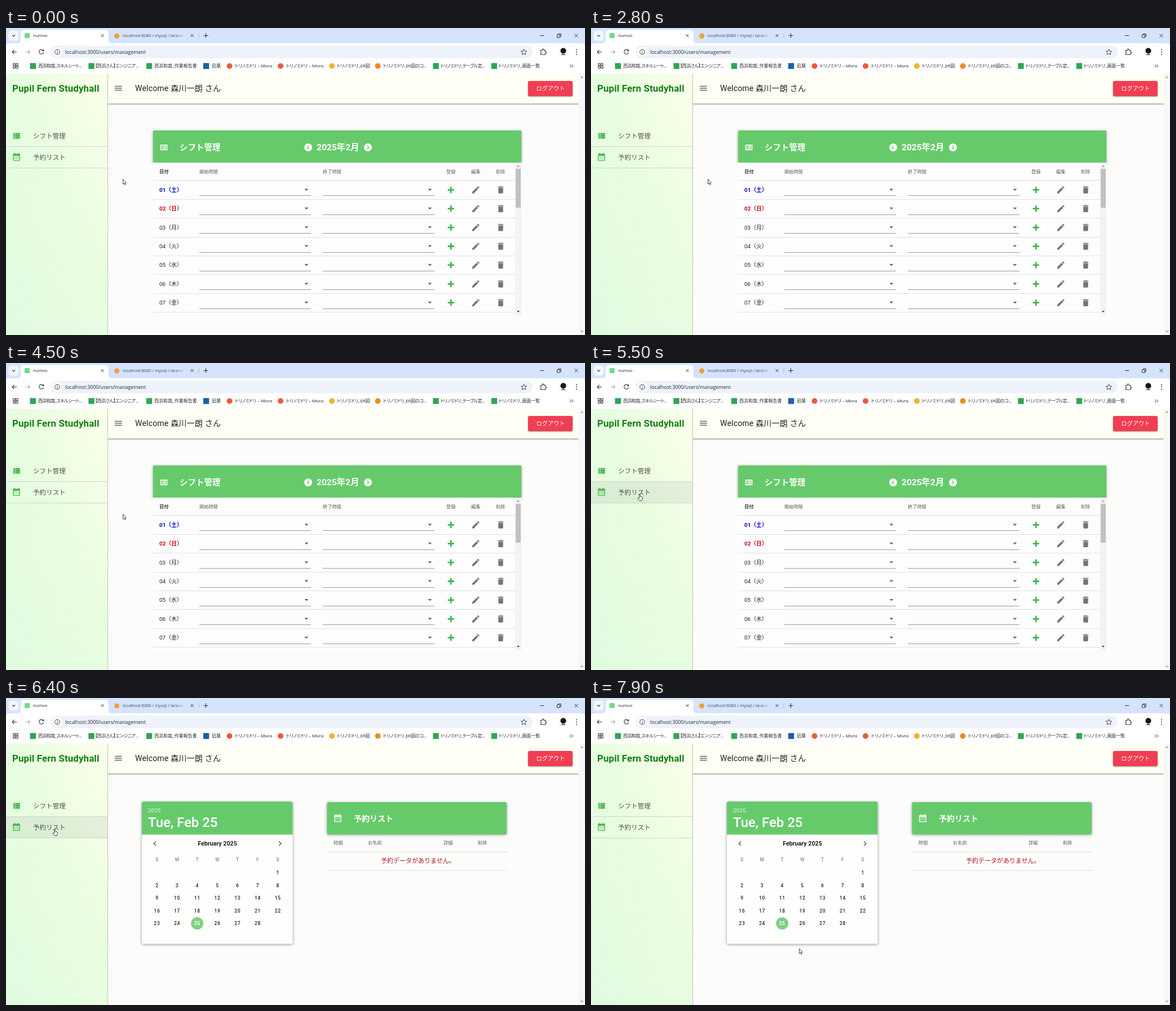
These frames come from a looping animation (1027x545 px, 8000 ms). An HTML page:

```html
<!DOCTYPE html>
<html lang="ja">
<head>
<meta charset="utf-8">
<title>Shift management</title>
<style>
html, body { margin: 0; width: 100%; height: 100%; overflow: hidden; background: #fff; }
svg { display: block; width: 1027px; height: 545px; }
text { white-space: pre; }
.app { font-family: Roboto, "Noto Sans CJK JP", sans-serif; }
.ui { font-family: "Open Sans", "Noto Sans CJK JP", sans-serif; font-feature-settings: "palt"; }
.card { filter: drop-shadow(0 1.5px 2.5px rgba(0,0,0,.42)); }
.low { filter: drop-shadow(0 1px 1.2px rgba(0,0,0,.4)); }
</style>
</head>
<body>
<svg id="stage" viewBox="0 0 1027 545" xmlns="http://www.w3.org/2000/svg"></svg>
<script>
const LOOP = 8000, GREEN = '#66ca6b', ICON_GREEN = '#43b649', INK = '#212121', GREY = '#5f5f5f';
const TEAM = 'トリノミドリ', OWNER = '西浜和哉';

const ICONS = {
  list: 'M9,5V9H21V5M9,19H21V15H9M9,14H21V10H9M4,9H8V5H4M4,19H8V15H4M4,14H8V10H4V14Z',
  listBox: 'M3 5H21V19H3ZM5 7V17H19V7ZM6.5 8.2H8.5V10H6.5ZM10 8.2H17.5V10H10ZM6.5 11.1H8.5V12.9H6.5ZM10 11.1H17.5V12.9H10ZM6.5 14H8.5V15.8H6.5ZM10 14H17.5V15.8H10Z',
  month: 'M9,10V12H7V10H9M13,10V12H11V10H13M17,10V12H15V10H17M19,3A2,2 0 0,1 21,5V19A2,2 0 0,1 19,21H5C3.89,21 3,20.1 3,19V5A2,2 0 0,1 5,3H6V1H8V3H16V1H18V3H19M19,19V8H5V19H19M9,14V16H7V14H9M13,14V16H11V14H13M17,14V16H15V14H17Z',
  plus: 'M20 14H14V20H10V14H4V10H10V4H14V10H20Z',
  pencil: 'M20.71,7.04C21.1,6.65 21.1,6 20.71,5.63L18.37,3.29C18,2.9 17.35,2.9 16.96,3.29L15.12,5.12L18.87,8.87M3,17.25V21H6.75L17.81,9.93L14.06,6.18Z',
  bin: 'M19,4H15.5L14.5,3H9.5L8.5,4H5V6H19M6,19A2,2 0 0,0 8,21H16A2,2 0 0,0 18,19V7H6Z',
  menu: 'M3,6H21V8H3M3,11H21V13H3M3,16H21V18H3Z'
};

const rect = (x, y, w, h, fill, more = '') =>
  `<rect x="${x}" y="${y}" width="${w}" height="${h}" fill="${fill}" ${more}/>`;
const circle = (x, y, r, fill, more = '') => `<circle cx="${x}" cy="${y}" r="${r}" fill="${fill}" ${more}/>`;
const path = (d, fill, more = '') => `<path d="${d}" fill="${fill}" ${more}/>`;
const stroke = (d, color = '#333', w = 1.1) => path(d, 'none', `stroke="${color}" stroke-width="${w}"`);
const icon = (name, x, y, fill, size = 16.9) =>
  path(ICONS[name], fill, `fill-rule="evenodd" transform="translate(${x - size / 2} ${y - size / 2}) scale(${size / 24})"`);
// y is the vertical middle of the line
const text = (x, y, s, size, fill = INK, weight = 400, more = '') =>
  `<text x="${x}" y="${(y + size * .36).toFixed(2)}" font-size="${size}" fill="${fill}" font-weight="${weight}" ${more}>${s}</text>`;
const mid = 'text-anchor="middle"';
const spaced = n => `letter-spacing="${n}"`;

function tabs() {
  const cross = (x, y, r) => stroke(`M${x - r} ${y - r}l${2 * r} ${2 * r}m0 ${-2 * r}l${-2 * r} ${2 * r}`, '#333', 1);
  return rect(0, 0, 1027, 40, '#d5e3fc') +
    rect(4.5, 4.5, 18, 18, '#f2f6fe', 'rx="5.5"') + stroke('M11 12.3l2.6 2.6 2.6-2.6') +
    path('M20 27Q26 27 26 21V9Q26 3.500 31.500 3.500H176Q181.500 3.500 181.500 9V21Q181.500 27 188 27Z', '#fff') +
    rect(33, 9, 9, 9, '#6fdc86', 'rx="1.5"') + text(48, 13.5, 'numvo', 7.8) + cross(171, 13.5, 2.4) +
    circle(196.5, 14, 4.6, '#eda23c') +
    text(207, 13.5, 'localhost:8080 / mysql / laravel', 7.5, '#454b55') +
    rect(300, 6, 18, 16, 'url(#tabFade)') + rect(318, 6, 6, 16, '#d5e3fc') + cross(330, 13.5, 2.4) +
    stroke('M342 9v9', '#9fb2d4', .8) + stroke('M350.500 13.500h8m-4-4v8') +
    stroke('M947 13.500h7.500', '#222', .9) + stroke('M977.500 12h5v5h-5zM979.500 12v-1.700h4.800v5h-1.800', '#222', .9) + cross(1011.5, 13.5, 3);
}

function toolbar() {
  return path('M0 33Q0 27 6 27H1021Q1027 27 1027 33V81H0Z', '#fff') +
    stroke('M19 42.500h-8m3.700-3.700l-3.700 3.700 3.700 3.700') +
    stroke('M34.500 42.500h8m-3.700-3.700l3.700 3.700-3.700 3.700', '#aaa') +
    stroke('M66.300 40.200A4 4 0 1 0 66.600 43.500M66.700 37.800v2.900h-3') +
    rect(79, 31.5, 855, 22, '#edf2fb', 'rx="11"') + circle(91, 42.5, 8.5, '#fff') +
    circle(91, 42.5, 4.4, 'none', 'stroke="#333"') + stroke('M91 42v2.700m0-4.700v1.100') +
    text(105, 42.5, 'localhost:3000/users/management', 8.8, '#26292e') +
    stroke('M918.500 37.700l1.500 3.300 3.600.3-2.700 2.400.8 3.500-3.200-1.900-3.200 1.900.8-3.500-2.700-2.400 3.600-.3z', '#333', .9) +
    stroke('M948.500 39.500h3v-1.300a1.200 1.200 0 0 1 2.400 0v1.300h3v2.700h.5a1.200 1.200 0 0 1 0 2.400h-.5v2.700h-8.400v-2.600a1.400 1.400 0 0 0 0-2.600z', '#333') +
    circle(988, 42, 8, '#f4f4f4') + circle(988.5, 40.5, 5, '#151515') + path('M984 48q4.500-4 9 0z', '#555') +
    [38.5, 42.5, 46.5].map(y => circle(1012, y, 1, '#333')).join('');
}

function bookmarks() {
  const green = '#2fa653', items = [
    [48, 57, OWNER + '_スキルシート...', green, -.6],
    [151.5, 158, '【西浜さん】エンジニア...', green, -.4],
    [254, 263, OWNER + '_作業報告書', green, 0],
    [355, 365, '凪葉', '#1c5fa8', 0],
    [396.5, 406, TEAM + ' – Mivra', '#f0583a', -.1, 1],
    [487, 497, TEAM + ' – Mivra', '#f0583a', -.1, 1],
    [578, 587, TEAM + '_ER図', '#f0b429', -.1, 1],
    [659.5, 669, TEAM + '_ER図のコ...', '#ee8a22', -.25, 1],
    [762.500, 771, TEAM + '_テーブル定...', green, -.5],
    [866, 874, TEAM + '_画面一覧', green, -.1]
  ];
  let out = '';
  for (let i = 0; i < 4; i++)
    out += rect(12.8 + i % 2 * 5, 63 + (i >> 1) * 5, 3.4, 3.4, 'none', 'stroke="#333" stroke-width="1"');
  out += stroke('M42.500 61.500v12', '#c3d5f3', 1);
  for (const [ix, x, s, color, gap, round] of items)
    out += (round ? circle(ix, 67.5, 5, color) : rect(ix - 5.2, 62.3, 10.4, 10.4, color, 'rx="1"')) +
      text(x, 67.5, s, 8, '#2b2b2b', 400, spaced(gap));
  return out + stroke('M1000 64.800l2.600 2.600-2.600 2.600m3.400-5.200l2.600 2.600-2.600 2.600', '#333', 1);
}

function appBar() {
  return rect(181, 81, 836, 464, '#fcfcfb') +
    `<g style="filter:drop-shadow(0 1.500px 1.600px rgba(0,0,0,.5))">${rect(170, 76, 846, 58, '#fefef4')}</g>` +
    rect(170, 70, 857, 11, '#fff') +
    icon('menu', 199.3, 107, '#666') +
    text(229, 107, 'Welcome 森川一朗 さん', 14.06, INK, 400, spaced(.176)) +
    `<g class="low">${rect(926, 94, 79, 27, '#f03e52', 'rx="2.8"')}</g>` +
    text(966, 107.3, 'ログアウト', 10.2, '#fff', 500, mid);
}

function sidebar() {
  const line = y => rect(0, y, 180, 1, '#c6d9d4');
  return rect(0, 81, 180, 464, 'url(#side)') + rect(180, 81, 1, 464, '#bcc4b8') +
    text(11, 106.8, 'Pupil Fern Studyhall', 16.9, '#108010', 700, spaced(.12)) +
    rect(0, 211, 180, 38, '#000', 'id="hover" opacity="0"') +
    '<g clip-path="url(#row)"><circle id="ripple" fill="#000" opacity="0"/></g>' +
    line(210) + line(248) +
    icon('list', 18.6, 191.5, ICON_GREEN) + icon('month', 18.6, 229.5, ICON_GREEN) +
    text(48, 191.5, 'シフト管理', 11.4, '#4c544a', 500, spaced(.2)) +
    text(48, 229.5, '予約リスト', 11.4, '#4c544a', 500, spaced(.2));
}

function shiftPage() {
  let out = `<g class="card">${rect(261, 182, 653, 57, GREEN, 'rx="1"')}</g>` + rect(261, 239, 642, 271, '#fdfdfd') +
    icon('listBox', 280, 212, '#fff') + text(308, 211.5, 'シフト管理', 14.3, '#fff', 700, spaced(.2)) +
    circle(536, 212, 7, '#fff') + stroke('M537.500 208.800l-3.200 3.200 3.200 3.200', GREEN, 1.4) +
    text(551, 211.8, '2025年2月', 15.5, '#fff', 700) +
    circle(642, 212, 7, '#fff') + stroke('M640.500 208.800l3.200 3.200-3.200 3.200', GREEN, 1.4);
  [[272, '日付'], [343, '開始時間'], [562, '終了時間'], [781, '登録'], [825, '編集'], [869, '削除']]
    .forEach(([x, s], i) => out += text(x, 254.7, s, 8.2, i ? GREY : '#333', i ? 500 : 700));
  out += rect(261, 270, 642, 1, '#dcdfe8');
  [...'土日月火水木金'].forEach((day, i) => {
    const y = 287.3 + i * 33.4;
    out += text(272, y, `0${i + 1}（${day}）`, 9.84, ['#0000c4', '#cc0011'][i] || INK, i < 2 ? 700 : 400);
    for (const x of [343, 562])
      out += rect(x, Math.round(y + 10), 198, 1, '#9a9a9a') + path(`M${x + 186.4} ${y - 1.9}h7l-3.500 3.500z`, '#666');
    out += icon('plus', 789.2, y, ICON_GREEN) + icon('pencil', 833.3, y, '#757575') + icon('bin', 877.5, y, '#757575') +
      rect(261, Math.round(y + 16.4), 642, 1, '#e2e2e2');
  });
  return out + rect(903, 239, 11, 271, '#f2f2f8') + rect(904, 250, 9, 69, '#c1c1c1') +
    path('M906 246.500h5l-2.500-3z', '#9a9aa0') + path('M906 502h5l-2.500 3z', '#45455c');
}

function bookingPage() {
  const colX = i => 267.6 + 35.73 * i;
  let out = `<g class="card">${rect(241, 184, 267.5, 252.5, '#fefefd', 'rx="2.8"')}</g>` +
    path('M241 242.500V186.800Q241 184 243.800 184H505.700Q508.500 184 508.500 186.800V242.500Z', GREEN) +
    text(252, 199.2, '2025', 9.84, 'rgba(255,255,255,.68)', 500) +
    text(252, 220.5, 'Tue, Feb 25', 23.9, '#fff', 500) +
    stroke('M265.800 254.800l-3.700 3.700 3.700 3.700M484.200 254.800l3.700 3.700-3.700 3.700', '#555', 1.4) +
    text(375, 258.6, 'February 2025', 10.7, INK, 700, mid);
  [...'SMTWTFS'].forEach((s, i) => out += text(colX(i), 287, s, 8.3, '#999', 700, mid));
  for (let d = 1; d <= 28; d++) {
    const x = colX((d + 5) % 7), y = 310.3 + 22.45 * Math.floor((d + 5) / 7), on = d === 25;
    if (on) out += circle(x, y, 10.9, '#7ecf83');
    out += text(x + .3, y, d, 8.44, on ? '#fff' : INK, on ? 700 : 500, `${mid} ${spaced(.75)}`);
  }
  out += `<g class="card">${rect(569.5, 185, 318.5, 57, GREEN, 'rx="2"')}</g>` +
    icon('month', 588.5, 214, '#fff') + text(617, 213.7, '予約リスト', 14, '#fff', 700);
  [[581, '時間'], [642, 'お名前'], [776, '詳細'], [837, '削除']]
    .forEach(([x, s]) => out += text(x, 257.5, s, 8.2, GREY, 500));
  return out + rect(569.5, 273, 318.5, 1, '#e0e0e4') + rect(569.5, 305.5, 318.5, 1, '#e0e0e4') +
    text(665, 289.3, '予約データがありません。', 11, '#b5122d');
}

const scrollbar = rect(1016, 81, 11, 464, '#f7f7f7') +
  path('M1018.700 88.500h5.600l-2.800-3.200z', '#a5a5a5') + path('M1018.700 537.500h5.600l-2.800 3.200z', '#a5a5a5');

const outline = 'stroke="#333" stroke-width=".9" stroke-linejoin="round"';
const pointers = `<g id="arrow">${path('M.5 .5V9.200L2.400 7.400 3.800 10.400 5.200 9.700 3.800 6.900H6.300Z', '#fff', outline)}</g>` +
  `<g id="hand">${path('M-.9 .9Q0-.4 .9 .9V4.500L3.600 5Q5 5.300 4.900 6.700L4.300 9.500 3.700 12H-.6L-3.300 8.600Q-4.200 7.200-3 6.800L-.9 7.800Z', '#fff', outline)}</g>`;

const stage = document.getElementById('stage');
stage.innerHTML = `<defs>
  <linearGradient id="side" x1="0" y1="1" x2="1" y2="0"><stop stop-color="#e0fbe0"/><stop offset=".55" stop-color="#e8fde0"/><stop offset="1" stop-color="#fbffea"/></linearGradient>
  <linearGradient id="tabFade"><stop stop-color="#d5e3fc" stop-opacity="0"/><stop offset="1" stop-color="#d5e3fc"/></linearGradient>
  <clipPath id="row">${rect(0, 211, 180, 38, '#000')}</clipPath></defs>
  <g class="app">${appBar()}<g id="shift">${shiftPage()}</g><g id="booking">${bookingPage()}</g>${sidebar()}</g>
  <g class="ui">${tabs()}${toolbar()}${bookmarks()}</g>${scrollbar}${pointers}`;

const el = Object.fromEntries(['hover', 'ripple', 'shift', 'booking', 'arrow', 'hand']
  .map(id => [id, document.getElementById(id)]));
const show = (node, on) => node.setAttribute('display', on ? 'inline' : 'none');
const ramp = (t, a, b) => Math.min(1, Math.max(0, (t - a) / (b - a)));
const smooth = k => k * k * (3 - 2 * k);
const mix = (a, b, k) => a + (b - a) * k;

const REST = [207, 268], LINK = [86.500, 232.500], END = [369, 444.500];
const PRESS = 5690, SWAP = 5780;

function draw(t) {
  const go = smooth(ramp(t, 4700, 5400)), leave = smooth(ramp(t, 6800, 7500));
  const [x, y] = [0, 1].map(i => mix(mix(REST[i], LINK[i], go), END[i], leave));
  const over = x < 180 && y > 211 && y < 249;
  show(el.arrow, !over);
  show(el.hand, over);
  (over ? el.hand : el.arrow).setAttribute('transform', `translate(${x} ${y})`);
  el.hover.setAttribute('opacity', over ? .06 : 0);

  const grow = 1 - (1 - ramp(t, PRESS, PRESS + 300)) ** 3;
  el.ripple.setAttribute('cx', mix(LINK[0], 89.7, grow));
  el.ripple.setAttribute('cy', mix(LINK[1], 229.5, grow));
  el.ripple.setAttribute('r', mix(28, 91, grow));
  el.ripple.setAttribute('opacity', .27 * ramp(t, PRESS, PRESS + 100) * (1 - ramp(t, 5990, 6290)));

  show(el.shift, t < SWAP);
  show(el.booking, t >= SWAP);
}

const start = performance.now();
function tick(now) {
  draw(Math.max(0, now - start) % LOOP);
  requestAnimationFrame(tick);
}
draw(0);
requestAnimationFrame(tick);
</script>
</body>
</html>
```
